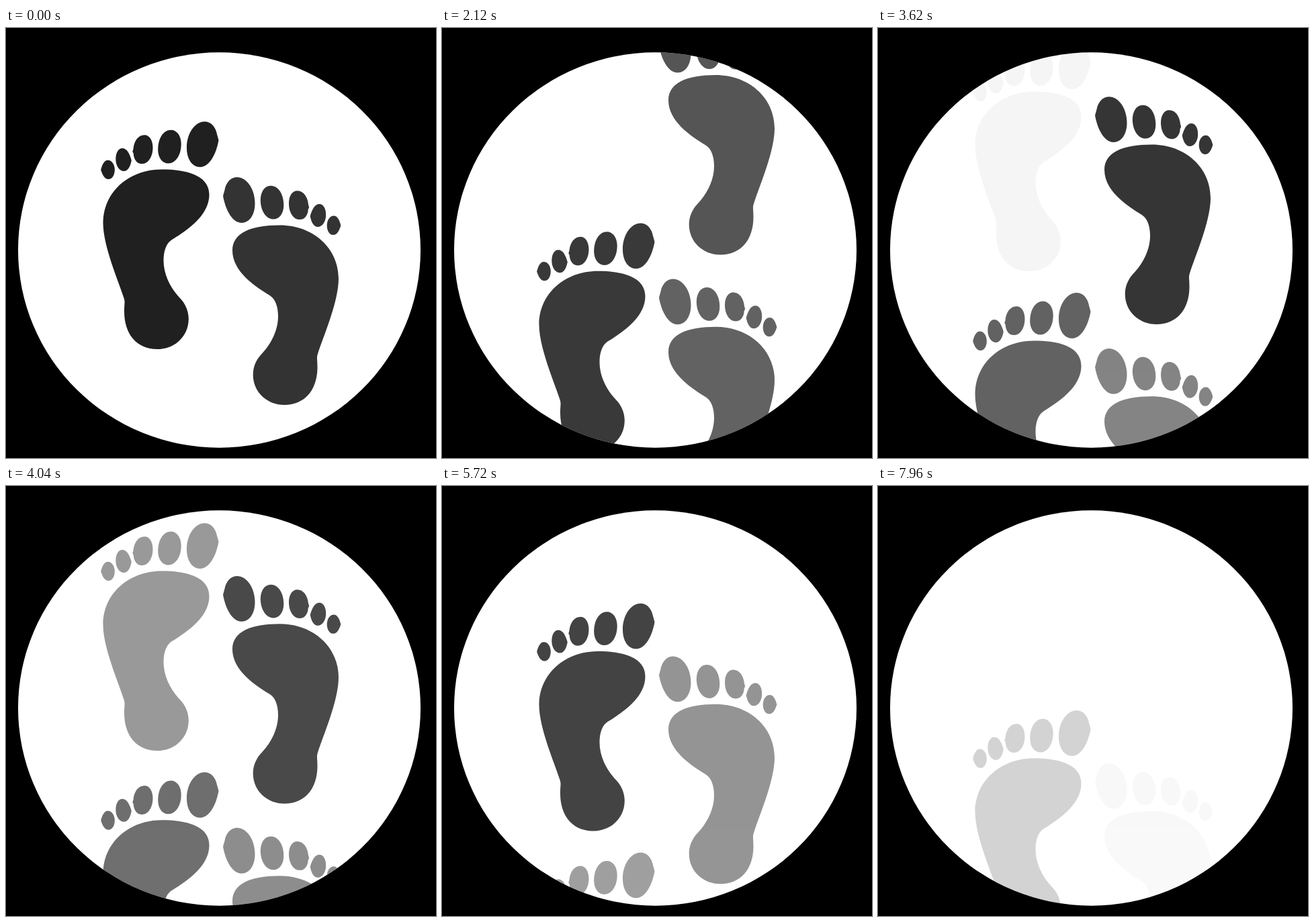
An HTML page that plays this animation: 640x640 px, repeating every 8000 ms.

```html
<!DOCTYPE html>
<html lang="en">
<head>
<meta charset="utf-8">
<title>Footprints</title>
<style>
  html, body { margin: 0; width: 100%; height: 100%; overflow: hidden; background: #000; }
  svg { display: block; width: 100vw; height: 100vh; }
</style>
</head>
<body>
<svg viewBox="0 0 640 640">
  <defs>
    <clipPath id="disc"><ellipse cx="317.5" cy="330.5" rx="299.5" ry="294.2"/></clipPath>
    <g id="left" fill="#1a1a1a">
      <path d="M232 210.5C275 210.5 302.5 222 302.5 248C302.5 279 270 301 247 315C239 320 234.5 331 234.5 346C234.5 367 245 387 258 401C267 410 271.8 421 271.8 433C271.8 459 251 478 225 478C195 478 176 456 176 422C176 409 177.5 408 175.5 402C168 378 144.5 325 144.5 290C144.5 245 182 210.5 232 210.5Z"/>
      <path d="M296 139.2C306 139.2 312.5 149 314 158L316.5 167C313 187 303 207 289 207C277 207 269 195 269 178C269 157 281 139.2 296 139.2Z"/>
      <path d="M245.5 151.8C254.5 151.8 260.7 161 260.7 173C260.7 189 252.5 201.6 241.5 201.6C232.5 201.6 226.2 193 226.2 181C226.2 164.5 234 151.8 245.5 151.8Z"/>
      <path d="M206 159.3C213.5 159.3 218.5 167 218.5 178C218.5 192 211.5 202.2 202 202.2C194.5 202.2 190 195 189.8 187L188.3 184L189.5 180C190.5 168 197 159.3 206 159.3Z"/>
      <path d="M173 179C180 179 184 187 186.8 197C185 207 181 213 175.5 213C168.5 213 163.3 205 163.3 195C163.3 186 167 179 173 179Z"/>
      <path d="M151.5 196.7C157.5 196.7 161.8 203 161.8 211C161.8 219 158 225 152.5 225C147 225 143.5 219 141.2 211C143 203 146.5 196.7 151.5 196.7Z"/>
    </g>
    <use id="right" href="#left" transform="translate(639.5 82.9) scale(-1 1)"/>
  </defs>
  <rect width="640" height="640"/>
  <ellipse cx="317.5" cy="330.5" rx="299.5" ry="294.2" fill="#fff"/>
  <g id="walk" clip-path="url(#disc)"></g>
</svg>
<script>
  const LOOP = 8000;
  const SPEED = 7.965;                      // px per step
  const CYCLE = 560;                        // five uneven steps
  const BEATS = [0, 140, 230, 320, 440];

  // y: start offset; show: fade-in steps; hide: fade-out steps
  const feet = [
    { side: "left",  y: 0,      show: [-9.7, 0.26],  hide: [9.3, 80.8] },
    { side: "right", y: 0,      show: [-30, -20],    hide: [-9.9, 80.6] },
    { side: "right", y: -374.8, show: [11.6, 21.6],  hide: [26.5, 72] },
    { side: "left",  y: -370.7, show: [31.55, 41.55], hide: [45.3, 76.9] }
  ];

  const walk = document.getElementById("walk");
  for (const foot of feet) {
    foot.node = document.createElementNS("http://www.w3.org/2000/svg", "use");
    foot.node.setAttribute("href", "#" + foot.side);
    walk.append(foot.node);
  }

  const ramp = (n, [from, to]) => Math.min(1, Math.max(0, (n - from) / (to - from)));

  function stepAt(time) {
    const t = time - 120;
    if (t < 0) return 0;
    const beat = BEATS.filter(b => b <= t % CYCLE).length;
    return Math.floor(t / CYCLE) * BEATS.length + beat;
  }

  function draw(now) {
    const n = stepAt(now % LOOP);
    for (const { node, y, show, hide } of feet) {
      node.setAttribute("transform", `translate(0 ${y + n * SPEED})`);
      node.setAttribute("opacity", ramp(n, show) * (1 - ramp(n, hide)));
    }
  }

  function tick() {
    draw(performance.now());
    requestAnimationFrame(tick);
  }
  tick();
</script>
</body>
</html>
```
